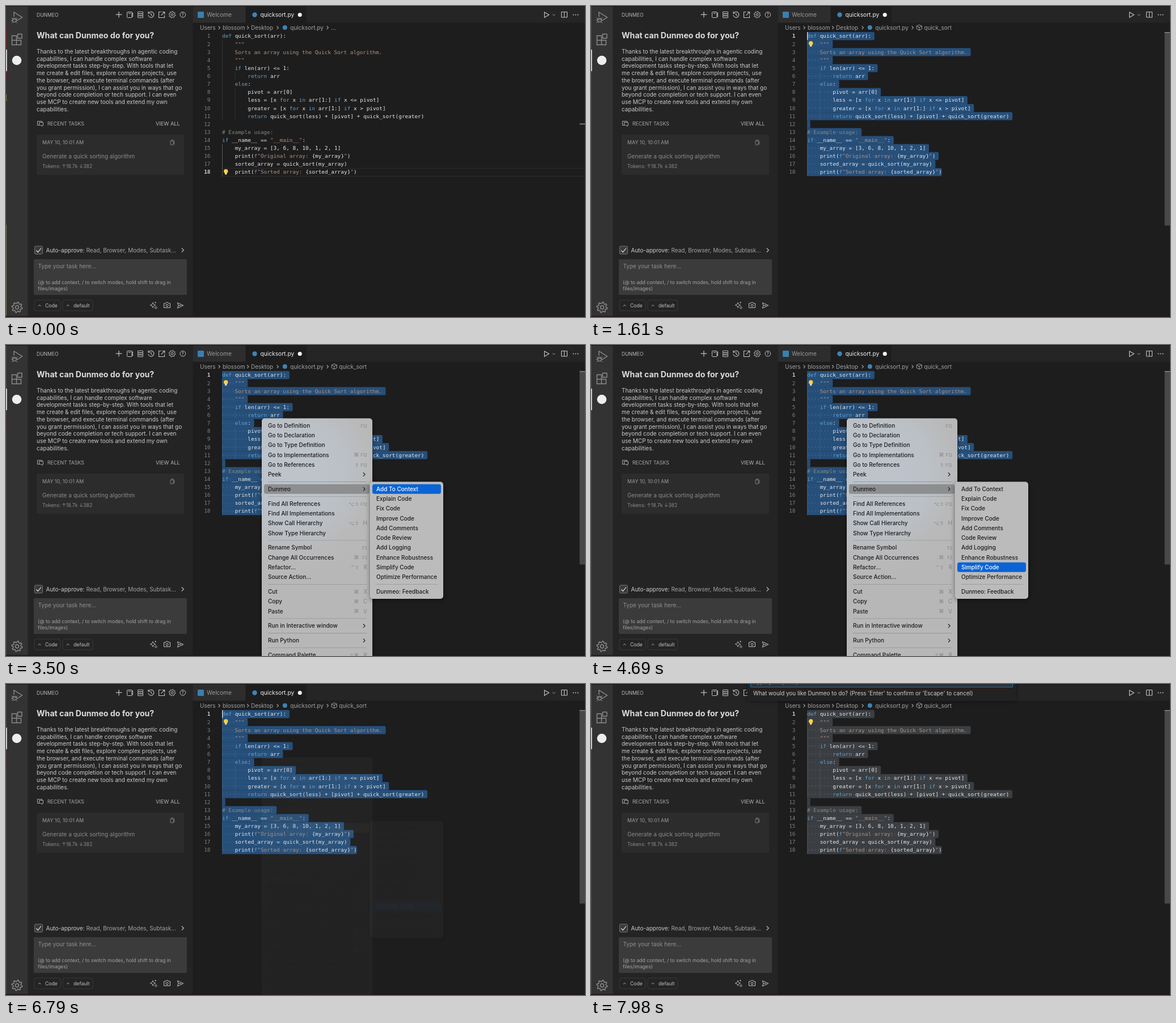
Write an HTML page with a canvas that moves like this. It is 1021x549 px and loops after 8000 ms.

```html
<!DOCTYPE html>
<html lang="en">
<head>
<meta charset="utf-8">
<title>Editor context menu</title>
<style>
html, body { margin: 0; width: 100%; height: 100%; overflow: hidden; background: #1d1d1d; }
canvas { display: block; width: 1021px; height: 549px; }
</style>
</head>
<body>
<canvas id="stage"></canvas>
<script>
const W = 1021, H = 549, LOOP = 8000;
const canvas = document.getElementById('stage');
const ctx = canvas.getContext('2d');
const dpr = window.devicePixelRatio || 1;
canvas.width = W * dpr;
canvas.height = H * dpr;

const UI = 'Inter, "Liberation Sans", sans-serif';
const MONO = '"DejaVu Sans Mono", "Liberation Mono", monospace';
const SYMBOL = '"DejaVu Sans", sans-serif';
const APP = 'Dunmeo';
const CODE_X = 381, CHAR_W = 5.659, ROW_H = 14.12, CODE_TOP = 46;

const CODE = [
  'def quick_sort(arr):',
  '    """',
  '    Sorts an array using the Quick Sort algorithm.',
  '    """',
  '    if len(arr) <= 1:',
  '        return arr',
  '    else:',
  '        pivot = arr[0]',
  '        less = [x for x in arr[1:] if x <= pivot]',
  '        greater = [x for x in arr[1:] if x > pivot]',
  '        return quick_sort(less) + [pivot] + quick_sort(greater)',
  '',
  '# Example usage:',
  'if __name__ == "__main__":',
  '    my_array = [3, 6, 8, 10, 1, 2, 1]',
  '    print(f"Original array: {my_array}")',
  '    sorted_array = quick_sort(my_array)',
  '    print(f"Sorted array: {sorted_array}")'
];
const LAST = CODE.length - 1;

// label | modifiers | key; '>' opens a submenu, '-' is a separator
const MENU = [
  'Go to Definition||F12', 'Go to Declaration', 'Go to Type Definition',
  'Go to Implementations|⌘|F12', 'Go to References|⇧|F12', 'Peek|>', '-',
  APP + '|>', '-',
  'Find All References|⌥⇧|F12', 'Find All Implementations',
  'Show Call Hierarchy|⌥⇧|H', 'Show Type Hierarchy', '-',
  'Rename Symbol||F2', 'Change All Occurrences|⌘|F2', 'Refactor...|⌃⇧|R',
  'Source Action...', '-', 'Cut|⌘|X', 'Copy|⌘|C', 'Paste|⌘|V', '-',
  'Run in Interactive window|>', '-', 'Run Python|>', '-', 'Command Palette...|⇧⌘|R'
];
const SUBMENU = [
  'Add To Context', 'Explain Code', 'Fix Code', 'Improve Code', 'Add Comments',
  'Code Review', 'Add Logging', 'Enhance Robustness', 'Simplify Code',
  'Optimize Performance', '-', APP + ': Feedback'
];

const clamp = v => Math.max(0, Math.min(1, v));
const span = (t, a, b) => clamp((t - a) / (b - a));
const ease = p => p * p * (3 - 2 * p);

function box(x, y, w, h, color, r = 0) {
  ctx.fillStyle = color;
  ctx.beginPath();
  ctx.roundRect(x, y, w, h, r);
  ctx.fill();
}
function frame(x, y, w, h, color, r = 0, lw = 1) {
  ctx.strokeStyle = color;
  ctx.lineWidth = lw;
  ctx.beginPath();
  ctx.roundRect(x, y, w, h, r);
  ctx.stroke();
}
function path(d, color, lw = 1) {
  ctx.lineWidth = lw;
  ctx.strokeStyle = color;
  ctx.stroke(new Path2D(d));
}
function disc(x, y, r, color) {
  ctx.fillStyle = color;
  ctx.beginPath();
  ctx.arc(x, y, r, 0, 7);
  ctx.fill();
}
function ring(x, y, r, color, lw = 1) {
  ctx.strokeStyle = color;
  ctx.lineWidth = lw;
  ctx.beginPath();
  ctx.arc(x, y, r, 0, 7);
  ctx.stroke();
}
// y is the optical middle of the line
function text(s, x, y, color, size = 10, weight = 400, align = 'left', family = UI) {
  ctx.font = `${weight} ${size}px ${family}`;
  ctx.textAlign = align;
  ctx.fillStyle = color;
  ctx.fillText(s, x, y + size * 0.355);
}
function gear(x, y, r, color, lw = 1) {
  ctx.beginPath();
  for (let i = 0; i < 32; i++) {
    const a = (i + 0.5) * Math.PI / 16;
    const d = i % 4 < 2 ? r : r * 0.74;
    ctx.lineTo(x + Math.cos(a) * d, y + Math.sin(a) * d);
  }
  ctx.closePath();
  ctx.strokeStyle = color;
  ctx.lineWidth = lw;
  ctx.stroke();
  ring(x, y, r * 0.32, color, lw);
}
const chevron = (x, y, color, s = 3) =>
  path(`M${x - s / 2} ${y - s}l${s} ${s}l${-s} ${s}`, color, 1.1);

function activityBar(t) {
  box(0, 0, 38.5, H, '#333333');
  if (t < 420) {
    box(0, 36, 1.2, 96, '#6a2327');
    box(0, 156, 1.2, 12, '#77744c');
    box(0, 386, 1.2, 160, '#6d6a48');
  } else {
    box(0, 0, 1, H, '#46464a');
    box(0, 122, 1, 30, '#5a3236');
  }
  box(0, 77, 1.8, 38, '#d8d8d8');
  const c = '#8d8d8d';
  path('M14 19V11L28.5 20L20 25.5', c, 1.4);
  ring(15, 25, 3.4, c, 1.3);
  path('M9.5 21l3 2M9 25.5h2.5M10 30l2.6-2M20.5 21l-3 2M18.5 25.5h2.5M20 30l-2.6-2M12 24h6', c);
  path('M10.5 52.5h8v16h-8zM10.5 60.5h16v8h-16z', c, 1.4);
  frame(20.5, 49.5, 7.5, 7.5, c, 0.5, 1.4);
  disc(19, 96, 8.3, '#eeeeee');
  gear(19.5, 532, 9.3, c, 1.4);
}

function sidebar() {
  box(38.5, 0, 291, H, '#242425');
  const c = '#c2c2c2', dim = '#8b8b8b';
  text(APP.toUpperCase(), 54, 15.5, '#b6b6b6', 8.6);

  path('M199 10v10.5M193.7 15.2h10.6', c, 1.2);
  frame(213.5, 10.5, 8.5, 10, c, 1);
  path('M215.5 13h4.5M222 12h1.5v3H222M222 16h1.5v3H222', c);
  for (let i = 0; i < 3; i++) frame(232.5, 10.3 + i * 3.6, 9, 3.2, c, 0.5);
  path('M251.5 12.5A5 5 0 1 1 250.8 16M251 9.8v3.2h3.2M255.8 12.5v3.2l2.2 1.3', c, 1.1);
  path('M273.5 10.5h-4v10h10v-4M275.5 10.5h4.2v4.2M279.5 10.6l-6 6', c, 1.1);
  gear(293, 15.3, 5.8, c);
  ring(311.8, 15.3, 4.8, c);
  text('?', 311.8, 15.5, c, 7.5, 500, 'center');

  text(`What can ${APP} do for you?`, 54, 51.5, '#dcdcdc', 14.1, 700);
  [
    'Thanks to the latest breakthroughs in agentic coding',
    'capabilities, I can handle complex software',
    'development tasks step-by-step. With tools that let',
    'me create & edit files, explore complex projects, use',
    'the browser, and execute terminal commands (after',
    'you grant permission), I can assist you in ways that go',
    'beyond code completion or tech support. I can even',
    'use MCP to create new tools and extend my own',
    'capabilities.'
  ].forEach((s, i) => text(s, 54, 80.3 + i * 12.75, '#cacaca'));

  path('M58 210.5h-2.5v-7h8v2M58.5 205.5h7v5h-1.5v2l-2.3-2h-3.2z', '#a8a8a8');
  text('RECENT TASKS', 73, 208, '#a8a8a8', 8.7);
  text('VIEW ALL', 264, 208, '#b4b4b4', 9.2);

  box(54, 227, 260, 71, '#2c2c2d', 2);
  text('MAY 10, 10:01 AM', 64, 240.8, dim, 8.7, 500);
  path('M291.5 238v-1.5h3.2l2 2v5.5h-1.5', dim, 0.9);
  frame(290, 238.2, 5, 6.8, dim, 0.5, 0.9);
  text('Generate a quick sorting algorithm', 64, 265, dim);
  text('Tokens: ↑18.7k ↓382', 64, 282.8, dim, 8.7);

  box(50.5, 424, 14, 14, '#3a3a3a', 2);
  frame(50.5, 424, 14, 14, '#767676', 2);
  path('M53.3 431.3l3 3.2 5.6-7', '#e4e4e4', 1.2);
  text('Auto-approve:', 70.5, 431.3, '#cccccc');
  text('Read, Browser, Modes, Subtask...', 141.5, 431.3, '#a3a3a3');
  chevron(311.5, 431, '#c8c8c8', 3.6);

  box(49, 447, 270, 63, '#3b3b3c', 2);
  text('Type your task here...', 56.5, 459.8, '#8f8f8f');
  text('(@ to add context, / to switch modes, hold shift to drag in', 56, 487.8, '#a4a4a4', 8.7);
  text('files/images)', 56, 499.3, '#a4a4a4', 8.7);

  [[50, 46, 'Code'], [100, 53, 'default']].forEach(([x, w, s]) => {
    frame(x, 519, w, 19, '#393939', 4);
    path(`M${x + 7} 530l2.2-2.6 2.2 2.6`, '#a0a0a0');
    text(s, x + 19, 528.5, '#c0c0c0', 8.7);
  });
  path('M259 523.5l1.4 3.2 3.2 1.4-3.2 1.4-1.4 3.2-1.4-3.2-3.2-1.4 3.2-1.4z', c, 0.9);
  path('M264.3 530l.8 1.7 1.7.8-1.7.8-.8 1.7-.8-1.7-1.7-.8 1.7-.8zM263.5 522v3M262 523.5h3', c, 0.7);
  path('M278.5 525h2.7l1.2-1.7h3.2l1.2 1.7h2.7v7.6h-11z', c);
  ring(284, 528.6, 2, c);
  path('M302.3 523.8l10.6 4.8-10.6 4.8 1.7-4.8zM304 528.6h5', c);
}

function tabs() {
  box(329.5, 0, W, 29.5, '#252526');
  box(329.5, 0, 92.5, 29.5, '#2d2d2d');
  box(423, 0, 106.5, 30, '#1d1d1d');
  box(338, 10, 11, 11, '#3a7fb0', 1);
  text('Welcome', 354, 15.7, '#9a9a9a');
  disc(438.5, 15.5, 4.2, '#3f83b5');
  text('quicksort.py', 448.5, 15.7, '#f0f0f0', 10.2);
  disc(518.2, 15.5, 3.6, '#f2f2f2');
  const c = '#c4c4c4';
  path('M949.5 11v9.2l8-4.6z', c, 1.1);
  path('M963.7 14.5l2.4 2.4 2.4-2.4', '#9a9a9a');
  frame(979.5, 10.5, 10, 9.5, c, 0.5, 1.1);
  path('M984.5 10.5v9.5', c, 1.1);
  for (let i = 0; i < 3; i++) disc(1000.5 + i * 4, 15.5, 0.95, c);
}

function breadcrumb(inFunction) {
  const c = '#a2a2a2';
  text('Users', 342, 38.3, c);
  chevron(376, 38.3, c, 2.8);
  text('blossom', 382, 38.3, c);
  chevron(426.5, 38.3, c, 2.8);
  text('Desktop', 432, 38.3, c);
  chevron(479, 38.3, c, 2.8);
  disc(491.8, 38, 4, '#3f83b5');
  text('quicksort.py', 501.3, 38.3, c);
  chevron(567, 38.3, c, 2.8);
  if (inFunction) {
    path('M578.8 33.2l4.6 2.2v5l-4.6 2.4-4.6-2.4v-5zM574.2 35.4l4.6 2.2 4.6-2.2M578.8 37.6v5.2', '#b4a8bd', 0.9);
    text('quick_sort', 587.3, 38.3, c);
  } else text('...', 573, 38.3, c);
}

const PLAIN = '#e8e8e8', WORD = '#66a3cf', STRING = '#b3917f', NOTE = '#838a80';
function tokens(line, i) {
  if (i > 0 && i < 4) return [[line, STRING]];
  if (line[0] === '#') return [[line, NOTE]];
  const parts = line.match(/f(?=")|"[^"{]*[{"]|}"|\w+|[^\w"}]+|./g) || [];
  return parts.flatMap(s => {
    if (s === '}"') return [['}', PLAIN], ['"', STRING]];
    if (s[0] === '"') return s.endsWith('{') ? [[s.slice(0, -1), STRING], ['{', PLAIN]] : [[s, STRING]];
    return [[s, /^(def|return|if|else|for|in|f)$/.test(s) ? WORD : PLAIN]];
  });
}
const TOKENS = CODE.map(tokens);
const rowTop = i => CODE_TOP + i * ROW_H;

function guide(x, from, to, color) {
  box(x, rowTop(from), 0.9, (to - from + 1) * ROW_H, color);
}

function editor(t) {
  box(329.5, 29.5, W, H, '#1d1d1d');
  tabs();

  const dragging = t >= 910;
  const line = dragging ? Math.round(LAST * (1 - ease(span(t, 910, 1500)))) : LAST;
  const focused = t < 7070;
  breadcrumb(dragging && line < 11);

  if (dragging) {
    const color = focused ? '#264f7a' : '#3b3e42';
    for (let i = line; i <= LAST; i++) {
      const n = CODE[i].length + (i < LAST ? 1 : 0);
      box(CODE_X, rowTop(i), n * CHAR_W, ROW_H + 0.15, color, [0, 2.5, 2.5, 0]);
    }
  } else {
    box(CODE_X, Math.round(rowTop(LAST)), W, 1, '#2a2a2a');
    box(CODE_X, Math.round(rowTop(LAST + 1)), W, 1, '#303030');
  }

  const faint = 'rgba(255,255,255,.11)';
  guide(CODE_X, 1, 10, faint);
  guide(CODE_X + 4 * CHAR_W, 5, 5, faint);
  guide(CODE_X + 4 * CHAR_W, 7, 10, faint);
  guide(CODE_X, 14, LAST, dragging ? faint : 'rgba(255,255,255,.28)');

  TOKENS.forEach((list, i) => {
    const y = rowTop(i) + 7.1;
    const active = i === line;
    text(i + 1, 360.5, y, active ? '#d0d0d0' : '#7d8083', 9.4, active ? 700 : 400, 'right', MONO);
    let col = 0;
    for (const [s, color] of list) {
      text(s, CODE_X + col * CHAR_W, y, color, 9.4, 400, 'left', MONO);
      col += s.length;
    }
    if (dragging && i >= line) {
      [...CODE[i]].forEach((ch, k) => {
        if (ch === ' ') disc(CODE_X + (k + 0.5) * CHAR_W, y, 0.6, 'rgba(220,230,240,.33)');
      });
    }
  });

  const menuOpen = t >= 2100 && t < 6600;
  if (dragging && focused && !menuOpen) box(CODE_X, rowTop(line), 1.4, ROW_H, '#d6d6d6');

  if (!dragging || t >= 1500) {
    const y = rowTop(dragging ? 1 : LAST) + 5.6;
    disc(387.7, y, 3.7, '#fbcf45');
    box(386, y + 2.8, 3.4, 3.2, '#e5d9a8', 0.8);
  }

  const bar = span(t, 420, 560);
  if (bar < 1) box(1011.5, 207.5, 9.5, 1.6, '#8a8a8a');
  if (bar > 0) {
    ctx.globalAlpha = bar;
    box(1011.5, 46, 9.5, 341.5, '#484848');
    box(1011.5, 46, 9.5, 1.4, '#8a8a8a');
    ctx.globalAlpha = 1;
  }
}

function menuPanel(x, y, w, h, fill) {
  ctx.save();
  ctx.shadowColor = 'rgba(0,0,0,.45)';
  ctx.shadowBlur = 9 * dpr;
  ctx.shadowOffsetY = 2 * dpr;
  box(x, y, w, h, fill, 5);
  ctx.restore();
  frame(x + 0.4, y + 0.4, w - 0.8, h - 0.8, 'rgba(255,255,255,.15)', 5, 0.7);
}

// hover is a row number counted without separators
function menuRows(rows, x, right, top, hover, hoverColor) {
  let y = top, n = 0;
  for (const row of rows) {
    if (row === '-') {
      box(x, y - 4.7, right - x - 1, 0.8, 'rgba(0,0,0,.2)');
      y += 8.6;
      continue;
    }
    const [label, mods, key] = row.split('|');
    const hot = n === hover;
    if (hot) box(x - 7, y - 8.6, right - x + 11, 17, hoverColor, 3.5);
    const color = hot && hoverColor === BLUE ? '#ffffff' : '#1c1c1e';
    text(label, x, y, color, 10, 500);
    if (mods === '>') chevron(right - 5.5, y, color, 3.3);
    else if (key) {
      text(mods, right - 14.5, y, '#858586', 9.3, 400, 'right', SYMBOL);
      const small = key.length > 1;
      text(key, right, y + (small ? 0.7 : 0), '#858586', small ? 7.3 : 10, 400, 'right');
    }
    y += 17.25;
    n++;
  }
}

const BLUE = '#0a64d6';
function menus(t) {
  if (t < 2100 || t >= 6800) return;
  ctx.globalAlpha = 1 - span(t, 6580, 6800);
  const g = ctx.createRadialGradient(500, 225, 40, 500, 225, 190);
  g.addColorStop(0, '#bcc3cb');
  g.addColorStop(0.4, '#bbc0c5');
  g.addColorStop(0.7, '#b9b9ba');
  g.addColorStop(1, '#b8b7b7');
  menuPanel(451, 129.5, 195, 440, g);
  const inSub = t >= 3150;
  const row = t < 2300 ? -1 : Math.round(6 * ease(span(t, 2300, 2700)));
  menuRows(MENU, 462, 637, 142.3, row, inSub ? '#8d8e90' : BLUE);
  if (t >= 2800) {
    menuPanel(642, 241.5, 129, 206.5, '#bcbbbb');
    const blink = t >= 6440 && t < 6510;
    const item = inSub && !blink ? Math.round(8 * ease(span(t, 3600, 4480))) : -1;
    menuRows(SUBMENU, 653, 763, 254.4, item, BLUE);
  }
  ctx.globalAlpha = 1;
}

function prompt(t) {
  if (t < 7070) return;
  ctx.save();
  ctx.shadowColor = 'rgba(0,0,0,.5)';
  ctx.shadowBlur = 6 * dpr;
  box(276, -20, 474, 50, '#222223', 5);
  ctx.restore();
  box(281.5, -20, 462, 25.5, '#313131', 2);
  frame(281.5, -20, 462, 25.5, '#1673b8', 2, 1.1);
  text('Type your prompt here', 287, -4, '#8a8a8a');
  text(`What would you like ${APP} to do? (Press 'Enter' to confirm or 'Escape' to cancel)`, 286, 16.5, '#cfcfcf', 9.9);
}

function draw(t) {
  ctx.setTransform(dpr, 0, 0, dpr, 0, 0);
  ctx.clearRect(0, 0, W, H);
  editor(t);
  sidebar();
  activityBar(t);
  box(0, 0, W, 0.9, '#171316');
  box(0, 547.2, W, 2, '#21171d');
  menus(t);
  prompt(t);
}

const start = performance.now();
function tick() {
  draw((performance.now() - start) % LOOP);
  requestAnimationFrame(tick);
}
tick();
</script>
</body>
</html>
```
